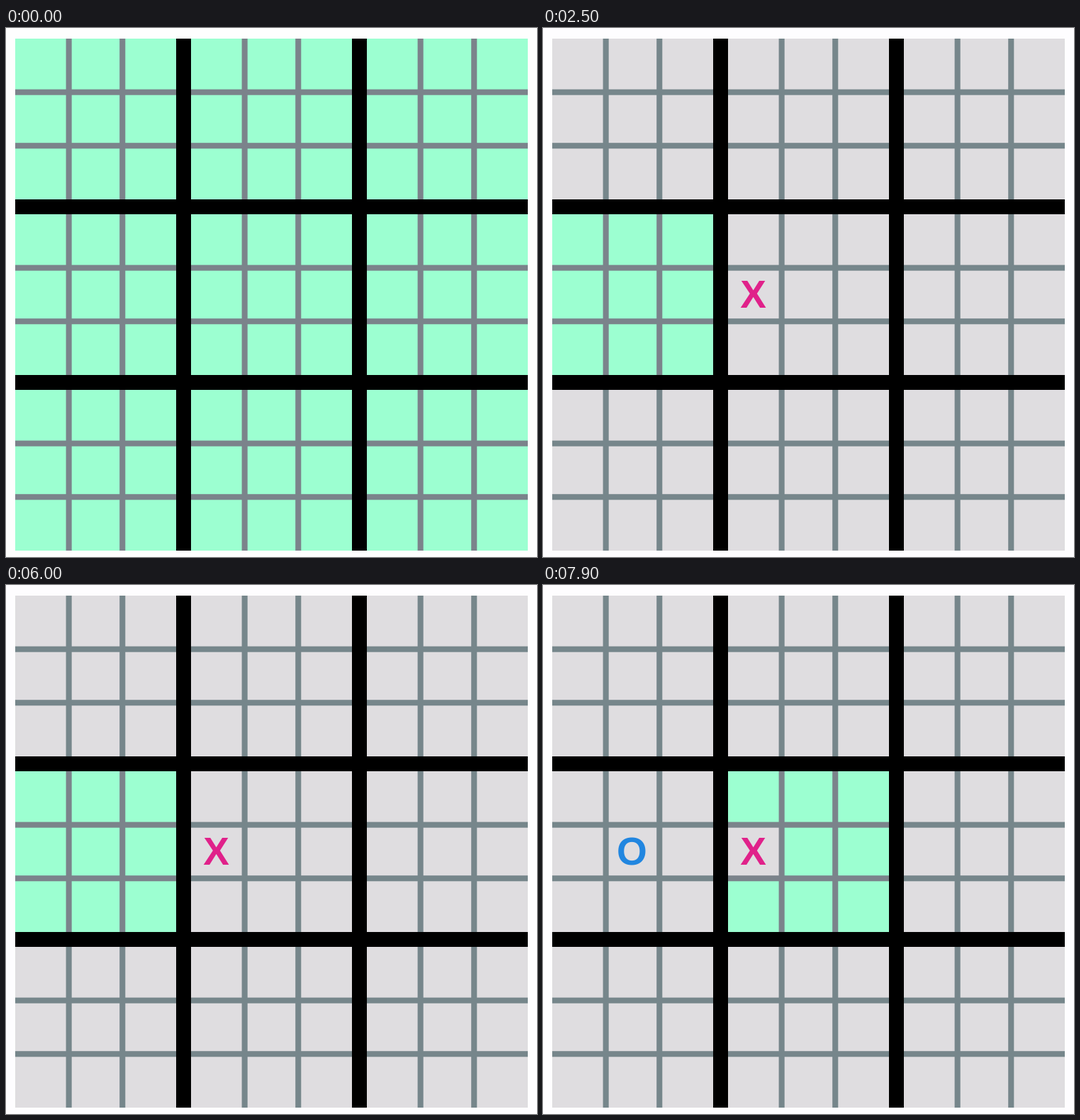
An HTML page that plays this animation: 749x747 px, repeating every 8000 ms.

```html
<!DOCTYPE html>
<html lang="en">
<head>
<meta charset="utf-8">
<title>Nested board game</title>
<style>
  html, body { margin: 0; width: 100%; height: 100%; overflow: hidden; background: #fff; }
  svg { display: block; width: 749px; height: 747px; }
  text { font: bold 55px "Liberation Sans", Arial, sans-serif; text-anchor: middle; }
</style>
</head>
<body>
<svg id="stage" viewBox="0 0 749 747"></svg>
<script>
const LOOP = 8000;
const LEFT = 13, TOP = 15, SIZE = 723, BLOCK = 227, PITCH = 248;
const SPANS = [[0, 71.6], [79.7, 147.2], [155.3, 227]];
const OPEN = { cell: '#9cffd1', line: '#7b838b' };
const SHUT = { cell: '#dfdde0', line: '#76868b' };

// Open blocks are numbered 0-8 by row, then column.
const steps = [
  { at: 0, open: [0, 1, 2, 3, 4, 5, 6, 7, 8], x: false, o: false, page: '#fefefe' },
  { at: 700, open: [3], x: true, o: false, page: '#fefdff' },
  { at: 7700, open: [4], x: true, o: true, page: '#fefdff' }
];

const stage = document.getElementById('stage');

function add(tag, attrs) {
  const el = document.createElementNS('http://www.w3.org/2000/svg', tag);
  for (const key in attrs) el.setAttribute(key, attrs[key]);
  return stage.appendChild(el);
}

function rect(x, y, width, height, fill) {
  return add('rect', { x, y, width, height, fill });
}

function mark(letter, x, fill) {
  const el = add('text', { x, y: 395, fill });
  el.textContent = letter;
  return el;
}

const page = rect(0, 0, 749, 747, '#fff');
rect(LEFT, TOP, SIZE, SIZE, '#000');

const blocks = Array.from({ length: 9 }, (_, i) => {
  const x = LEFT + i % 3 * PITCH;
  const y = TOP + Math.floor(i / 3) * PITCH;
  const back = rect(x, y, BLOCK, BLOCK, SHUT.line);
  const cells = SPANS.flatMap(([y0, y1]) =>
    SPANS.map(([x0, x1]) => rect(x + x0, y + y0, x1 - x0, y1 - y0, SHUT.cell)));
  return { back, cells };
});

const cross = mark('X', 296.5, '#e0218a');
const nought = mark('O', 125.5, '#2186e0');

function show(step) {
  page.setAttribute('fill', step.page);
  blocks.forEach((block, i) => {
    const look = step.open.includes(i) ? OPEN : SHUT;
    block.back.setAttribute('fill', look.line);
    block.cells.forEach((cell, j) => {
      const taken = step.x && i === 4 && j === 3;
      cell.setAttribute('fill', taken ? SHUT.cell : look.cell);
    });
  });
  cross.setAttribute('visibility', step.x ? 'visible' : 'hidden');
  nought.setAttribute('visibility', step.o ? 'visible' : 'hidden');
}

let current;
const start = performance.now();

function tick() {
  const t = (performance.now() - start) % LOOP;
  const step = steps.findLast(s => s.at <= t);
  if (step !== current) show(current = step);
  requestAnimationFrame(tick);
}
tick();
</script>
</body>
</html>
```
